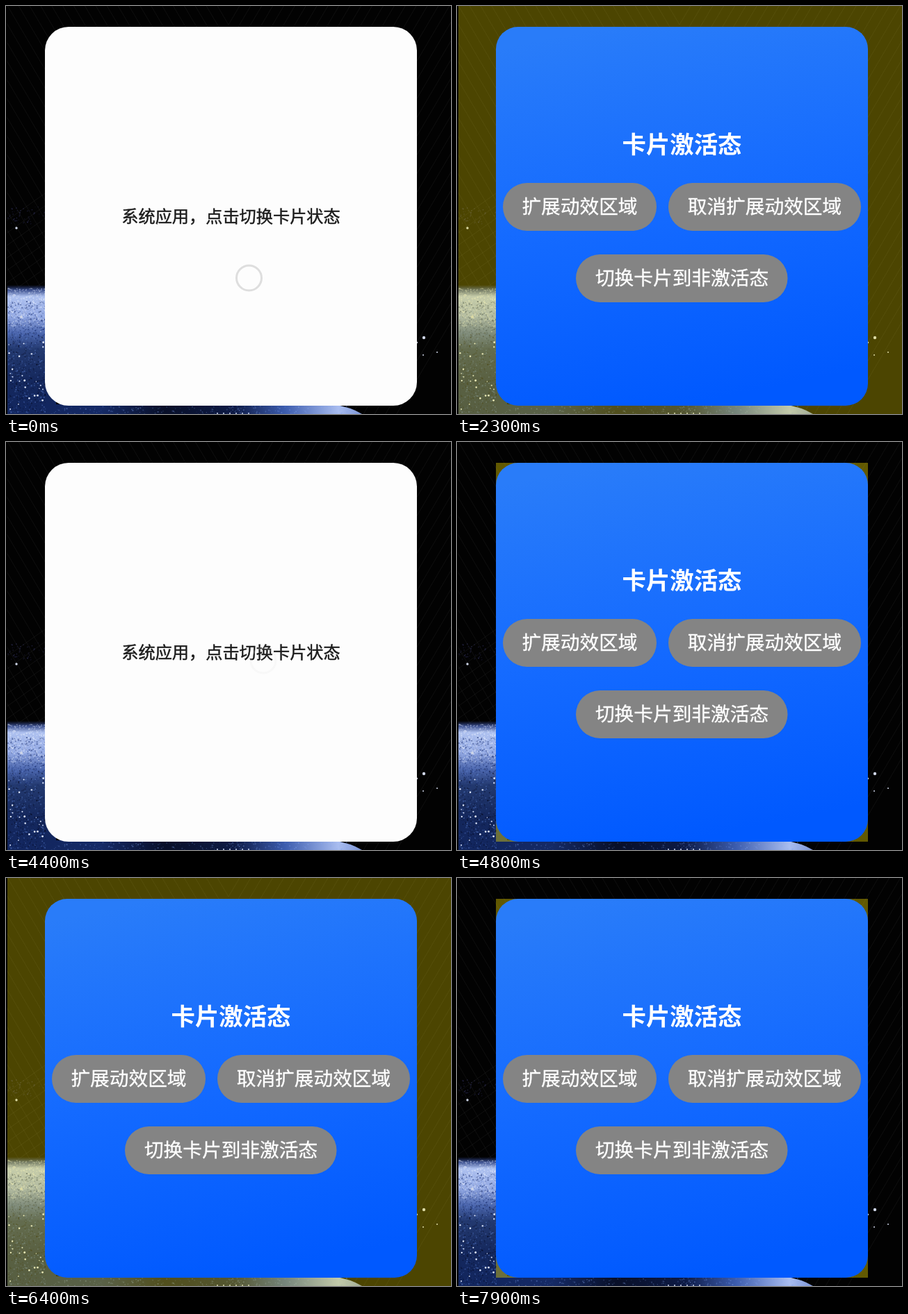
These frames come from a looping animation (640x588 px, 8 s). An HTML page with a canvas:

```html
<!DOCTYPE html>
<html lang="zh-CN">
<head>
<meta charset="utf-8">
<title>卡片状态</title>
<style>
  html, body { margin: 0; width: 100%; height: 100%; overflow: hidden; background: #000; }
  canvas, svg { position: absolute; left: 0; top: 0; width: 640px; height: 588px; }
  text { font-family: "Noto Sans CJK SC", "Noto Sans CJK", sans-serif; text-anchor: middle; }
  .label { font-size: 27.7px; font-weight: 500; fill: #fff; stroke: #fff; stroke-width: .35px; }
</style>
</head>
<body>
<canvas id="sky" width="640" height="588"></canvas>
<svg viewBox="0 0 640 588">
  <defs>
    <linearGradient id="blue" x1=".3" y1="0" x2=".5" y2="1">
      <stop offset="0" stop-color="#297cf9"/>
      <stop offset=".5" stop-color="#146aff"/>
      <stop offset="1" stop-color="#0059ff"/>
    </linearGradient>
  </defs>
  <rect id="region" fill="#ffe800"/>
  <g id="idle">
    <rect x="56" y="30" width="535" height="546" rx="34" fill="#fdfdfd"/>
    <text x="323.5" y="312" font-size="24.2" font-weight="500" fill="#1c1c1c" stroke="#1c1c1c" stroke-width=".45">系统应用，点击切换卡片状态</text>
    <circle id="ring" r="18" fill="none" stroke="#dedede" stroke-width="3"/>
  </g>
  <g id="active">
    <rect x="56" y="30" width="535" height="546" rx="32" fill="url(#blue)"/>
    <text x="323.5" y="212" font-size="34.4" font-weight="700" fill="#fff">卡片激活态</text>
    <g fill="#848484">
      <rect x="66" y="255" width="221" height="69" rx="34.5"/>
      <rect x="304" y="255" width="277" height="69" rx="34.5"/>
      <rect x="171" y="358" width="304.5" height="69" rx="34.5"/>
    </g>
    <text class="label" x="176.5" y="299">扩展动效区域</text>
    <text class="label" x="442.5" y="299">取消扩展动效区域</text>
    <text class="label" x="323.5" y="402">切换卡片到非激活态</text>
  </g>
</svg>
<script>
const LOOP = 8000;
const byId = id => document.getElementById(id);

// Each cue: start time, card state
const cues = [
  [0, 'idle'], [750, 'active'], [1950, 'wide'], [3350, 'idle'],
  [4450, 'active'], [5450, 'wide'], [6650, 'idle'], [7750, 'active']
];
// Each tap: x, y, shown from, fading from, gone at
const taps = [
  [349.5, 392, 0, 500, 720],
  [370, 315, 4200, 4280, 4430],
  [355, 350, 7500, 7580, 7730]
];

let seed = 11;
function random() {
  seed = (seed * 16807) % 2147483647;
  return seed / 2147483647;
}

function paintSky() {
  const c = byId('sky').getContext('2d');

  function fade(x0, y0, x1, y1, stops) {
    const g = c.createLinearGradient(x0, y0, x1, y1);
    stops.forEach(([at, color]) => g.addColorStop(at, color));
    return g;
  }
  function dot(x, y, r, color) {
    c.fillStyle = color;
    c.beginPath();
    c.arc(x, y, r, 0, 7);
    c.fill();
  }
  function specks(count, x, y, w, h, color, alpha) {
    for (let i = 0; i < count; i++) {
      c.fillStyle = `rgba(${color},${alpha * random()})`;
      const size = 1 + random();
      c.fillRect(x + w * random(), y + h * random(), size, size);
    }
  }

  c.fillStyle = '#020202';
  c.fillRect(0, 0, 640, 588);

  // Faint chevron lines
  c.strokeStyle = 'rgba(255,255,255,.05)';
  c.beginPath();
  for (let y = 0; y < 1000; y += 27) {
    c.moveTo(0, y - 544);
    c.lineTo(320, y);
    c.lineTo(640, y - 544);
  }
  for (let y = 310; y < 450; y += 18) {
    c.moveTo(0, y);
    c.lineTo(56, y - 40);
  }
  c.stroke();

  // Planet: left rim, then the strip showing below the card
  c.fillStyle = fade(0, 402, 0, 588, [
    [0, 'rgba(40,60,130,0)'], [.04, '#3c508f'], [.09, '#adc0ef'], [.24, '#93a9e4'],
    [.38, '#4b66ad'], [.5, '#23396f'], [.75, '#14275c'], [1, '#12265f']
  ]);
  c.fillRect(2, 402, 70, 186);
  c.fillStyle = fade(56, 0, 510, 0, [
    [0, '#12265f'], [.18, '#152a66'], [.38, '#080f28'], [.6, '#0d1a45'],
    [.76, '#3c5cae'], [.93, '#a9bdf0'], [1, '#7f98d8']
  ]);
  c.beginPath();
  c.moveTo(56, 574);
  c.lineTo(470, 574);
  c.quadraticCurveTo(496, 578, 512, 588);
  c.lineTo(56, 588);
  c.fill();
  specks(500, 2, 406, 54, 55, '230,238,255', .55);
  specks(420, 2, 425, 54, 70, '25,45,110', .6);
  specks(300, 2, 465, 54, 122, '100,140,225', .5);
  specks(300, 2, 470, 54, 117, '4,8,30', .6);
  specks(240, 56, 576, 440, 12, '130,165,240', .4);
  specks(60, 2, 288, 54, 28, '90,90,170', .45);
  c.fillStyle = '#000';
  c.fillRect(0, 0, 1.5, 588);

  // Stars
  for (let i = 0; i < 26; i++)
    dot(4 + 50 * random(), 465 + 120 * random(), .6 + .9 * random(), '#dfe8ff');
  [[15, 320, 1.7], [601, 478, 2.2], [22, 448, 2], [620, 499, 1], [600, 503, 1], [591, 485, 1.2], [587, 285, .8]]
    .forEach(([x, y, r]) => dot(x, y, r, '#cfd6e8'));
  for (let x = 304; x < 350; x += 9) dot(x, 587, 1, '#c8d4f2');
}

function setBox(el, x, y, width, height, opacity) {
  Object.entries({ x, y, width, height, opacity }).forEach(([k, v]) => el.setAttribute(k, v));
}

function render(now) {
  const t = now % LOOP;
  const state = cues.filter(cue => cue[0] <= t).pop()[1];
  byId('idle').style.display = state === 'idle' ? '' : 'none';
  byId('active').style.display = state === 'idle' ? 'none' : '';

  if (state === 'wide') setBox(byId('region'), 2, 0, 638, 588, .295);
  else setBox(byId('region'), 56, 30, 535, 546, state === 'active' ? .38 : 0);

  const tap = taps.find(([, , from, , end]) => t >= from && t < end);
  const ring = byId('ring');
  ring.setAttribute('opacity', tap ? Math.min(1, (tap[4] - t) / (tap[4] - tap[3])) : 0);
  if (tap) ring.setAttribute('transform', `translate(${tap[0]} ${tap[1]})`);
  requestAnimationFrame(render);
}

paintSky();
render(0);
</script>
</body>
</html>
```
